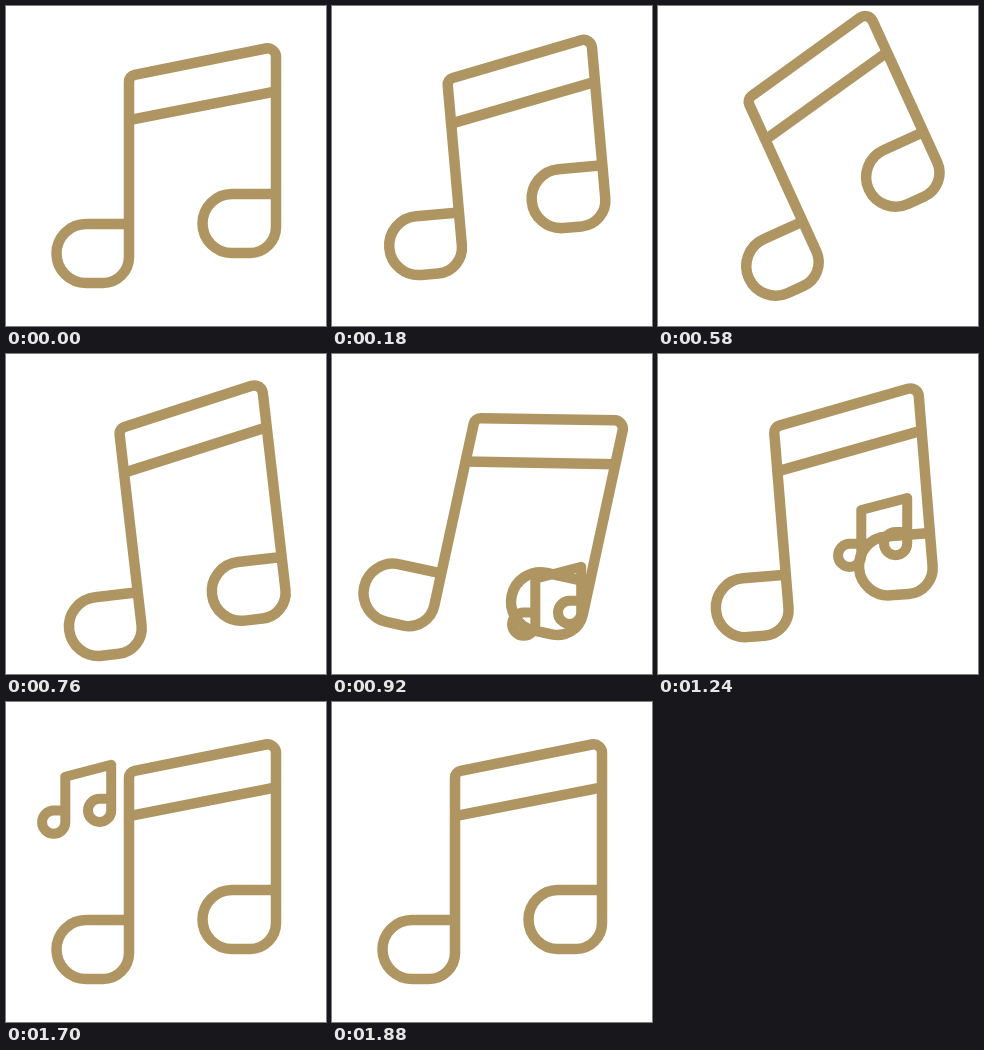
These frames come from a looping animation (320 px wide and 320 px high, 2 s). An HTML page:

```html
<!DOCTYPE html>
<html lang="en">
<head>
<meta charset="utf-8">
<title>Dancing music note</title>
<style>
  html, body { margin: 0; width: 100%; height: 100%; overflow: hidden; background: #fff; }
  svg { display: block; width: 100%; height: 100%; }
  path { fill: none; stroke: #af9562; stroke-linejoin: round; }
</style>
</head>
<body>
<svg viewBox="0 0 320 320">
  <g id="note" stroke-width="10.5">
    <path id="frame"/>
    <path d="M123 114.2L270 85.3"/>
  </g>
  <path class="small" stroke-width="10"/>
  <path class="small" stroke-width="10"/>
</svg>
<script>
const LOOP = 2000;

// Keyframes are [time in ms, value], eased in and out between neighbours.
const TILT = [[10, 0], [597, -24.6], [930, 12.3], [1180, -5.8], [1450, 3], [1680, 0]];
const LEFT_HEAD = [[20, 0], [400, -38], [800, 18], [1080, 0]];
const RIGHT_HEAD = [[20, 0], [400, -49], [800, 30], [1080, 0]];

// Small notes rise at a steady speed while visible.
const RISE = 0.215;
const SMALL = [
  { from: 880, to: 1420, x: 144, y: 107, at: 920 },
  { from: 1300, to: 1840, x: 0, y: 0, at: 1500 }
];

const note = document.getElementById('note');
const frame = document.getElementById('frame');
const smallNotes = document.querySelectorAll('.small');
smallNotes.forEach(el => el.setAttribute('d',
  'M59.3 151.8H47.7A11.6 11.6 0 1 0 59.3 163.4V118L105.2 106V151.6A11.6 11.6 0 1 1 93.6 140H105.2'));

function valueAt(keys, t) {
  if (t <= keys[0][0]) return keys[0][1];
  for (let i = 1; i < keys.length; i++) {
    const [t0, a] = keys[i - 1], [t1, b] = keys[i];
    if (t < t1) {
      const s = (t - t0) / (t1 - t0);
      return a + (b - a) * s * s * (3 - 2 * s);
    }
  }
  return keys[keys.length - 1][1];
}

function framePath(left, right) {
  return `M123 ${218 + left}H80A29.5 29.5 0 0 0 80 ${277 + left}H97` +
    `A26 26 0 0 0 123 ${251 + left}V75.7A7 7 0 0 1 128.6 68.8` +
    `L259.8 42.5A8.5 8.5 0 0 1 270 50.8V${221 + right}A26 26 0 0 1 244 ${247 + right}` +
    `H226A29.5 29.5 0 0 1 226 ${188 + right}H270`;
}

function render(t) {
  frame.setAttribute('d', framePath(valueAt(LEFT_HEAD, t), valueAt(RIGHT_HEAD, t)));
  note.setAttribute('transform', `rotate(${valueAt(TILT, t)} 160 160)`);
  SMALL.forEach((s, i) => {
    const visible = t >= s.from && t < s.to;
    smallNotes[i].setAttribute('visibility', visible ? 'visible' : 'hidden');
    smallNotes[i].setAttribute('transform', `translate(${s.x} ${s.y - (t - s.at) * RISE})`);
  });
}

const start = performance.now();
function tick() {
  render((performance.now() - start) % LOOP);
  requestAnimationFrame(tick);
}
tick();
</script>
</body>
</html>
```
